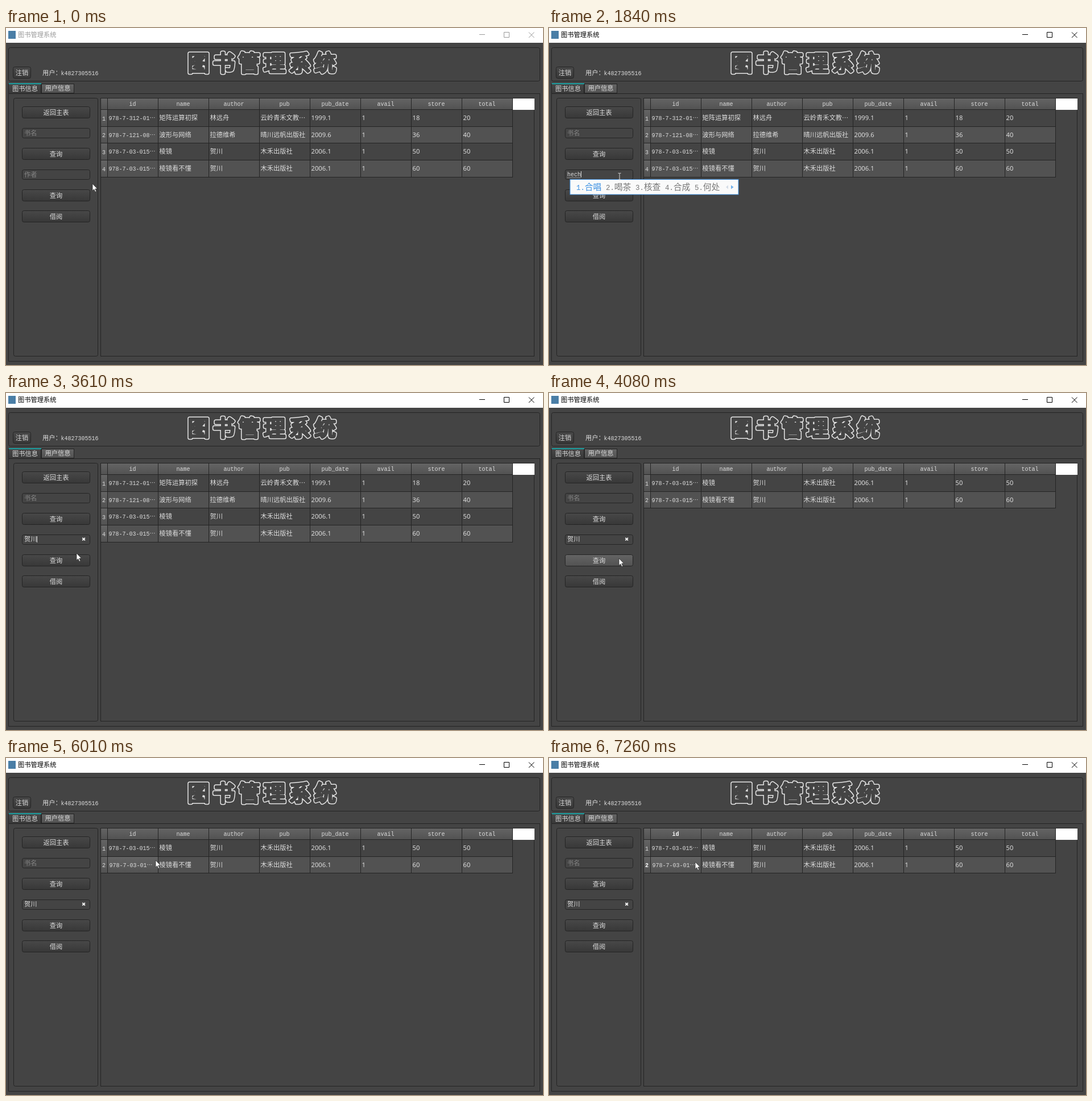
Write an HTML page that moves like this. It is 944 px wide and 593 px high and loops after 7.96 s.

```html
<!DOCTYPE html>
<html lang="zh-CN">
<head>
<meta charset="utf-8">
<style>
  html, body { margin: 0; width: 100%; height: 100%; overflow: hidden; background: #444; }
  svg { display: block; }
  text { font: 11.25px "Noto Sans", "Noto Sans CJK SC", sans-serif; fill: #dcdcdc; white-space: pre; }
  .mono { font: 10px "Liberation Mono", "Noto Sans CJK SC", monospace; }
  .mid { text-anchor: middle; }
  .bold { font-weight: 700; fill: #fff; }
  .hint { fill: #858585; }
  .num { font: 12.4px "Liberation Mono", monospace; }
  .cand { font: 14.8px "Noto Sans CJK SC", sans-serif; fill: #777; }
  .cand.num { font: 12.4px "Liberation Mono", monospace; }
  .face { font: 13px "Noto Sans", "DejaVu Sans", sans-serif; }
  .first { fill: #3c90e2; }
  .banner { font: 38px "Noto Sans CJK SC", sans-serif; letter-spacing: 6.5px; stroke-linejoin: round; }
</style>
</head>
<body>
<svg id="stage" width="944" height="593" viewBox="0 0 944 593">
  <defs>
    <linearGradient id="dark" x2="0" y2="1"><stop stop-color="#484848"/><stop offset="1" stop-color="#383838"/></linearGradient>
    <linearGradient id="light" x2="0" y2="1"><stop stop-color="#646464"/><stop offset="1" stop-color="#525252"/></linearGradient>
  </defs>
  <g id="base"></g>
  <g id="live"></g>
</svg>
<script>
const LOOP = 7960;
const COLUMNS = ['id', 'name', 'author', 'pub', 'pub_date', 'avail', 'store', 'total'];
const BOOKS = [
  ['978-7-312-01⋯', '矩阵运算初探', '林远舟', '云岭青禾文教⋯', '1999.1', '1', '18', '20'],
  ['978-7-121-08⋯', '波形与网络', '拉德维希', '晴川远帆出版社', '2009.6', '1', '36', '40'],
  ['978-7-03-015⋯', '棱镜', '贺川', '木禾出版社', '2006.1', '1', '50', '50'],
  ['978-7-03-015⋯', '棱镜看不懂', '贺川', '木禾出版社', '2006.1', '1', '60', '60']
];
const ROW_Y = [143, 173, 202, 232, 262];
const colX = i => 178 + 89 * i;

// [time, x, y, text beam?]
const POINTER = [
  [0, 152, 274], [70, 150, 273], [150, 146, 270], [230, 138, 264, 1], [300, 128, 261, 1], [380, 124, 261, 1],
  [3610, 124, 282], [3690, 123, 287], [3770, 123, 291],
  [5620, 127, 287], [5700, 150, 263], [5780, 190, 233], [5860, 232, 206], [5930, 255, 190],
  [6010, 263, 180], [6070, 264, 166], [6160, 263, 157],
  [6860, 263, 160], [6940, 262, 166], [7020, 260, 173], [7100, 258, 180], [7180, 257, 183]
];
const TYPED = [[0, ''], [1230, 'h'], [1390, 'he'], [1680, 'hec'], [1840, 'hech'], [2000, 'hechu'], [2230, 'hechuan'], [2690, '']];
const CANDIDATES = [
  [0, ''], [1230, '和 好 会 还 (oŐдŐ)b'], [1530, '和 喝 河 合 何'], [1760, '贺词 合成 核查 合唱 喝茶'],
  [1840, '合唱 喝茶 核查 合成 何处'], [2080, '何处 核出 合出 喝出 和出'],
  [2230, '贺川 河川 何川 喝穿 和川'], [2690, '']
];
const CARET = [[0, 0], [450, 1], [990, 0], [1530, 1], [2080, 0], [2540, 1], [3060, 0], [3610, 1], [4000, 0]];
const CLEAR = [[0, 0], [2690, .35], [2760, .7], [2830, 1]];

const stepAt = (steps, t) => steps.findLast(s => s[0] <= t);
const valueAt = (steps, t) => stepAt(steps, t)[1];

const text = (x, cy, str, cls = '', attrs = '') => `<text x="${x}" y="${cy + 4}" class="${cls}" ${attrs}>${str}</text>`;
const box = (x, y, w, h, fill = 'none', r = 0) =>
  `<rect x="${x + .5}" y="${y + .5}" width="${w}" height="${h}" rx="${r}" fill="${fill}" stroke="#242424"/>`;
const fill = (x, y, w, h, color) => `<rect x="${x}" y="${y}" width="${w}" height="${h}" fill="${color}"/>`;
const path = (d, color, attrs = '') => `<path d="${d}" fill="none" stroke="${color}" ${attrs}/>`;
const button = (x, y, w, label, tone = 'dark') =>
  box(x, y, w, 20, `url(#${tone})`, 3) + text(x + w / 2 + .5, y + 10.5, label, 'mid');

function base() {
  const banner = attrs => text(319.5, 71, '图书管理系统', 'banner', attrs);
  return fill(0, 0, 944, 26, '#fff') + fill(4, 5, 13, 14, '#4a7ea6')
    + box(4, 34, 934, 59, 'none', 3)
    + banner('style="stroke:#e6e6e6;stroke-width:7"') + banner('style="fill:#444;stroke:#444;stroke-width:4"')
    + button(12, 68, 31, '注销') + text(64, 79, '用户：') + text(96.5, 78.5, 'k4827305516', 'mono')
    + box(4, 115, 934, 471)
    + box(62, 98, 57, 16, 'url(#light)') + text(91, 106, '用户信息', 'mid')
    + box(4, 98, 57, 17, 'url(#dark)') + fill(5, 97, 57, 2, '#1c9fa0') + text(33.5, 106.5, '图书信息', 'mid')
    + box(13, 123, 148, 454, 'none', 3)
    + button(28, 138, 119, '返回主表') + box(28, 176, 119, 17, 'none', 3) + text(32, 184.5, '书名', 'hint')
    + button(28, 211, 119, '查询') + box(28, 249, 119, 17, 'none', 3) + button(28, 321, 119, '借阅')
    + box(166, 123, 762, 454) + fill(891, 124, 38, 20, '#fff');
}

function windowBar(active) {
  const color = active ? '#000' : '#999';
  return text(21, 12, '图书管理系统', '', `style="fill:${color}"`)
    + path('M832 11.5h10M875.5 7.5h9v9h-9zM919 7.5l9.5 9.5M928.5 7.5l-9.5 9.5', color);
}

function table(books, hoverRow, pickedRow) {
  let out = box(166, 123, 12, 20, 'url(#light)');
  COLUMNS.forEach((name, i) => {
    const cls = 'mono mid' + (i === 0 && pickedRow >= 0 ? ' bold' : '');
    out += box(colX(i), 123, 89, 20, 'url(#light)') + text(colX(i) + 44.5, 133, name, cls);
  });
  books.forEach((book, r) => {
    const y = ROW_Y[r], h = ROW_Y[r + 1] - y, cy = y + h / 2 + .5;
    out += box(166, y, 12, h, 'url(#light)') + text(172, cy, r + 1, 'mono mid' + (r === pickedRow ? ' bold' : ''));
    book.forEach((value, i) => {
      const hovered = i === 0 && r === hoverRow;
      const label = hovered ? value.slice(0, -2) + '⋯' : value;
      out += box(colX(i), y, 89, h, hovered ? 'url(#light)' : r % 2 ? '#525252' : '#444')
        + text(colX(i) + (hovered ? 3.5 : 2.5), cy - .5, label, i ? '' : 'mono');
    });
  });
  return out;
}

function authorField(t) {
  const typed = valueAt(TYPED, t), done = t >= 2690, clear = valueAt(CLEAR, t);
  let out = '', caretX = 32;
  if (done) {
    out += text(32, 257, '贺川');
    caretX = 54;
  } else if (typed) {
    caretX = 32 + 6 * typed.length;
    out += text(32, 257, typed, 'mono') + path(`M32 263.5H${caretX}`, '#dcdcdc', 'stroke-dasharray="1 1"');
  } else out += text(32, 257.5, '作者', 'hint');
  if (valueAt(CARET, t)) out += path(`M${caretX + .5} 252v11`, '#dcdcdc');
  if (clear) out += path('M134.3 254.8l4.6 4.6M138.9 254.8l-4.6 4.6', '#fff', `stroke-width="1.8" opacity="${clear}"`);
  return out;
}

function candidateBar(list) {
  if (!list) return '';
  const words = list.split(' '), pitch = words[0].length > 1 ? 52 : 37;
  const face = words[4].length > 2;
  const right = face ? 309 : 48 + 5 * pitch + 25;
  let out = `<rect x="37" y="266.5" width="${right - 37}" height="26.5" fill="#fafafa" stroke="#3c90e2"/>`;
  words.forEach((word, i) => {
    const x = 48 + pitch * i, tone = i ? '' : ' first';
    out += text(x, 281, `${i + 1}.`, 'cand num' + tone)
      + text(x + 14.8, 281.3, word.replace('д', ' д '), 'cand' + tone + (word.length > 2 ? ' face' : ''));
  });
  if (face) out += path('M79.5 273.5h4v4h-4z', '#3c90e2');
  return out + `<path d="M${right - 18} 276.5v7l-4-3.5z" fill="#d4dce6"/><path d="M${right - 13} 276.5v7l4.5-3.5z" fill="#6fb0ec"/>`;
}

function pointer([, x, y, beam]) {
  if (beam) return path(`M${x - 2.5} ${y - 5.5}h2l.5 .5 .5 -.5h2M${x} ${y - 5}v11M${x - 2.5} ${y + 6}h5`, '#d8d8d8');
  return `<path transform="translate(${x} ${y})" d="M0 0V12.4L2.8 9.8 4.8 14.4 6.8 13.5 4.8 9H8.6Z" fill="#fff" stroke="#222" stroke-width=".7"/>`;
}

function live(t) {
  const point = stepAt(POINTER, t), [, x, y] = point;
  const filtered = t >= 4080;
  const onButton = x > 28 && x < 147 && y > 284 && y < 304;
  const pressed = t >= 4000 && t < 4080;
  const hoverRow = x > 178 && x < 267 && y < 202 ? (y < 173 ? 0 : 1) : -1;
  const pickedRow = t >= 7260 ? 1 : t >= 6330 ? 0 : -1;
  return windowBar(t >= 450)
    + table(filtered ? BOOKS.slice(2) : BOOKS, hoverRow, pickedRow)
    + button(28, 284, 119, '查询', onButton && !pressed ? 'light' : 'dark')
    + authorField(t) + candidateBar(valueAt(CANDIDATES, t)) + pointer(point);
}

const layer = document.getElementById('live');
let shown = '';
function tick() {
  const markup = live(performance.now() % LOOP);
  if (markup !== shown) layer.innerHTML = shown = markup;
  requestAnimationFrame(tick);
}
document.getElementById('base').innerHTML = base();
tick();
</script>
</body>
</html>
```
